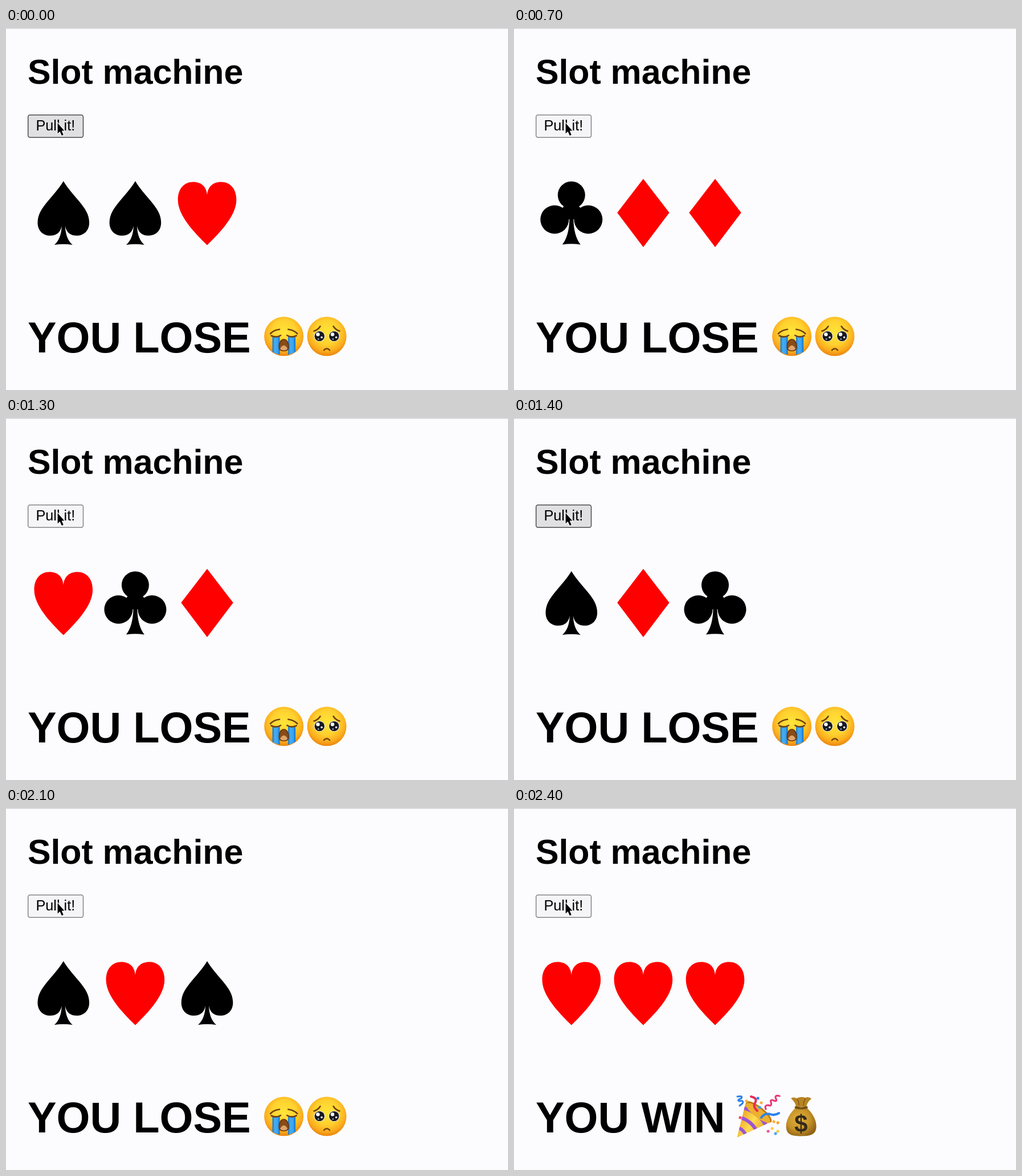
Write an HTML page that moves like this. It is 881 px wide and 636 px high and loops after 2500 ms.

```html
<!DOCTYPE html>
<html lang="en">
<head>
<meta charset="utf-8">
<title>Slot machine</title>
<style>
  html, body { margin: 0; width: 100%; height: 100%; overflow: hidden; background: #fcfcfe; }
  svg { display: block; width: 881px; height: 636px; }
  text { font-family: "Liberation Sans", Arial, Helvetica, sans-serif; }
  .bold { font-weight: bold; }
  .line { fill: none; stroke-linecap: round; stroke-linejoin: round; }
  #button { fill: #e0e0e3; stroke: #4c4c4e; stroke-width: 1.5; }
  #button.active { fill: #f5f5f8; stroke: #858587; }
</style>
</head>
<body>
<svg viewBox="0 0 881 636">
  <defs>
    <radialGradient id="skin" cx=".5" cy=".4" r=".62">
      <stop offset="0" stop-color="#ffe539"/>
      <stop offset=".5" stop-color="#ffd12f"/>
      <stop offset=".78" stop-color="#fbac1d"/>
      <stop offset="1" stop-color="#e87d0c"/>
    </radialGradient>
    <linearGradient id="tear">
      <stop offset="0" stop-color="#1470c8"/>
      <stop offset=".3" stop-color="#43adf3"/>
      <stop offset=".7" stop-color="#3aa3ee"/>
      <stop offset="1" stop-color="#146cc4"/>
    </linearGradient>
    <linearGradient id="cone" x1="0" y1=".3" x2="1" y2=".8">
      <stop offset="0" stop-color="#e79a1d"/>
      <stop offset=".45" stop-color="#ffdc50"/>
      <stop offset="1" stop-color="#d98a14"/>
    </linearGradient>
    <radialGradient id="bag" cx=".42" cy=".42" r=".62">
      <stop offset="0" stop-color="#e2b240"/>
      <stop offset=".6" stop-color="#c79328"/>
      <stop offset="1" stop-color="#916416"/>
    </radialGradient>
    <clipPath id="coneClip"><path d="M391.5 579 L406 520 Q430 526 452 551 Z"/></clipPath>

    <path id="spade" d="M0 269 C7 281 18 293 28 305 C38 317 45.3 328 45.3 342
      C45.3 356 36 364.8 23 364.8 C12 364.8 5 359 3 347.5 C3.5 363 8 374 16 381
      Q0 378.5 -16 381 C-8 374 -3.5 363 -3 347.5 C-5 359 -12 364.8 -23 364.8
      C-36 364.8 -45.3 356 -45.3 342 C-45.3 328 -38 317 -28 305 C-18 293 -7 281 0 269 Z"/>
    <path id="heart" fill="#f00" d="M0 293.5 C1 280 9 270.5 24.5 270.5
      C41 270.5 51.3 283 51.3 302 C51.3 329 24 358 0 381.5
      C-24 358 -51.3 329 -51.3 302 C-51.3 283 -41 270.5 -24.5 270.5 C-9 270.5 -1 280 0 293.5 Z"/>
    <path id="diamond" fill="#f00" d="M0 265 L45.7 324.5 L0 385 L-45.7 324.5 Z"/>
    <g id="club">
      <circle cy="293.5" r="24"/>
      <circle cx="-29.5" cy="336.5" r="25"/>
      <circle cx="29.5" cy="336.5" r="25"/>
      <path d="M0 293.5 L29 336 H3.5 C4 356 8 370 16 380.5 Q0 378 -16 380.5 C-8 370 -4 356 -3.5 336 H-29 Z"/>
    </g>
  </defs>

  <rect width="881" height="636" fill="#fcfcfe"/>
  <rect width="881" height="1.3" fill="#cfcfd2"/>
  <text class="bold" x="37.9" y="97.8" font-size="60.8">Slot machine</text>

  <rect id="button" x="38.7" y="152.7" width="96.8" height="39.6" rx="3.5"/>
  <text x="52.4" y="180" font-size="25.3">Pull it!</text>
  <path d="M90.6 167 V185.5 L94.5 181.8 L97.8 189 L100.8 187.7 L97.7 180.6 H102.4 Z"
    stroke="#fff" stroke-width="2.4" stroke-linejoin="round" paint-order="stroke"/>

  <g id="reels">
    <use transform="translate(100.8)"/>
    <use transform="translate(226.9)"/>
    <use transform="translate(353)"/>
  </g>

  <g id="lose">
    <text class="bold" x="37.9" y="570.4" font-size="75.8">YOU LOSE</text>
    <g id="crying">
      <circle cx="487.6" cy="541.8" r="34.5" fill="url(#skin)"/>
      <path fill="url(#tear)" d="M467.5 541 Q474 544 480.5 541 V574 Q473 572.5 467.5 569 Z"/>
      <path fill="url(#tear)" d="M495 541 Q501.5 544 508 541 V569 Q502 572.5 495 574 Z"/>
      <g class="line" stroke="#70400f" stroke-width="2.6">
        <path d="M464 537 Q470 530.5 480 529.5 M495.2 529.5 Q505 530.5 511.2 537"/>
        <path d="M465.5 540.5 Q474 545 482 540 M493.2 540 Q501 545 509.7 540.5"/>
      </g>
      <path fill="#8a4c17" stroke="#663208" stroke-width="1.6" d="M487.6 547 C493 547 496 554 496 560 C496 565.5 493 567.3 487.6 567.3 C482 567.3 479.2 565.5 479.2 560 C479.2 554 482 547 487.6 547 Z"/>
      <path fill="#dfa56b" d="M481 563.5 Q487.6 552 494.2 563.5 Q492 566.5 487.6 566.5 Q483 566.5 481 563.5 Z"/>
    </g>
    <g id="pleading">
      <circle cx="563" cy="541.8" r="34.5" fill="url(#skin)"/>
      <g class="line" stroke="#70400f" stroke-width="2.6">
        <path d="M540.5 532.5 Q547.5 530.5 551.5 524 M585.5 532.5 Q578.5 530.5 574.5 524"/>
        <path d="M558 566 Q563 560.5 568 566"/>
      </g>
      <g id="eyes"></g>
    </g>
  </g>

  <g id="win">
    <text class="bold" x="37.9" y="570.4" font-size="75.8">YOU WIN</text>
    <g id="popper">
      <path fill="url(#cone)" d="M391.5 579 L406 520 Q430 526 452 551 Z"/>
      <g class="line" stroke="#9c55d6" stroke-width="6" clip-path="url(#coneClip)">
        <path d="M394 562 Q403 565 408 577 M397 544 Q417 549 428 571 M402 527 Q429 533 445 562"/>
      </g>
      <ellipse cx="429.5" cy="534" rx="28" ry="9" transform="rotate(38 429.5 534)" fill="#bd7916"/>
      <ellipse cx="428.5" cy="535.5" rx="26" ry="8" transform="rotate(38 428.5 535.5)" fill="#eeb02e"/>
      <g class="line" stroke-width="4">
        <path stroke="#e72d55" d="M416 507 Q429 510 422 520 Q420 526 427 532"/>
        <path stroke="#2a82eb" d="M434 544 Q440 535 450 538 Q457 541 465 536"/>
        <path stroke="#2a82eb" stroke-width="3" d="M392 507 Q402 505 399 510 Q391 513 395 515 Q404 513 401 519 L396 523"/>
        <path stroke="#e83978" stroke-width="3.2" d="M442 529 Q439 522 446 522 Q453 525 451 517 Q449 511 456 514 Q463 517 459 509 Q458 504 466 506"/>
      </g>
      <g id="confetti"></g>
    </g>
    <g id="money">
      <path fill="url(#bag)" d="M495 526 C486 534 477.5 546 477.5 559 C477.5 573 486 576.5 504 576.5 C522 576.5 530.5 573 530.5 559 C530.5 546 522 534 513 526 Z"/>
      <path fill="#b78424" d="M495 525 C494 518 490 514 486 510 Q491 507 496 510 Q504 506 511 509 Q517 506 522 511 C517 515 514 519 513 525 Z"/>
      <path class="line" stroke="#805611" stroke-width="1.4" d="M500 522 Q500 516 497 512 M508 522 Q508 516 511 511"/>
      <path class="line" stroke="#765010" stroke-width="4" d="M494.5 526 Q504 529 513.5 526"/>
      <text class="bold" x="503.7" y="569" font-size="42" text-anchor="middle" fill="#352a1b">$</text>
    </g>
  </g>
</svg>
<script>
const LOOP = 2500;
const names = { S: "#spade", H: "#heart", D: "#diamond", C: "#club" };

// Each step: start time, the three suits, button held down
const steps = [
  [0, "SSH", false], [100, "SSH", true],
  [300, "CDD", false], [700, "CDD", true],
  [900, "HCD", false], [1200, "HCD", true],
  [1400, "SDC", false], [1600, "SDC", true],
  [1800, "SHS", false], [2100, "SHS", true],
  [2400, "HHH", true]
];

const byId = id => document.getElementById(id);
const dot = (x, y, r, color) => `<circle cx="${x}" cy="${y}" r="${r}" fill="${color}"/>`;

byId("eyes").innerHTML = [550.2, 575.8].map(x =>
  dot(x, 541.5, 9.6, "#fff") + dot(x, 541.5, 8.7, "#171921") +
  dot(x - 2.8, 538.2, 3.2, "#fff") + dot(x + 3.8, 543.5, 1.8, "#fff") +
  dot(x - 2, 546.5, 1.3, "#a8b9c8")
).join("");

byId("confetti").innerHTML = [
  [428, 510, "#2888ee"], [434, 518, "#ffac2f"], [408, 515, "#ffb331"],
  [431, 526, "#34a4ee"], [397, 544, "#f24769"], [456, 551, "#ffb02e"],
  [463, 553, "#ff9f2e"], [446, 568, "#ee5799"], [453, 563, "#ffc946"],
  [463, 568, "#ffcb3c"], [459, 572, "#4ba5f0"]
].map(([x, y, color], i) =>
  `<rect x="${x - 2.3}" y="${y - 2.3}" width="4.6" height="4.6" fill="${color}" transform="rotate(${i * 25} ${x} ${y})"/>`
).join("");

const reels = [...byId("reels").children];
let shown;

function draw() {
  const time = performance.now() % LOOP;
  const step = steps.findLast(([start]) => start <= time);
  if (step !== shown) {
    const [, suits, active] = step;
    const won = suits[0] === suits[1] && suits[1] === suits[2];
    reels.forEach((reel, i) => reel.setAttribute("href", names[suits[i]]));
    byId("button").classList.toggle("active", active);
    byId("win").style.display = won ? "" : "none";
    byId("lose").style.display = won ? "none" : "";
    shown = step;
  }
  requestAnimationFrame(draw);
}
draw();
</script>
</body>
</html>
```
